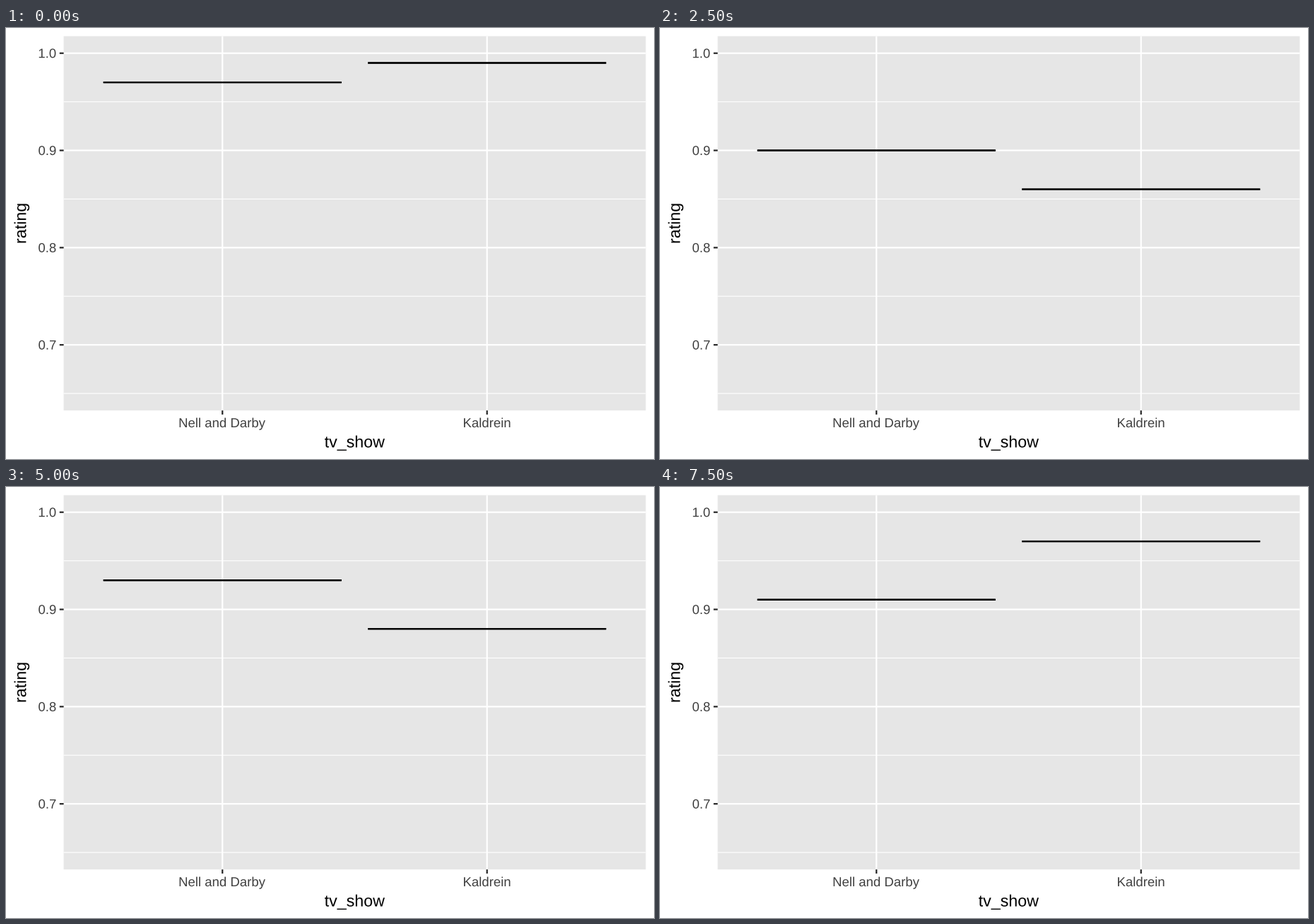
Recreate the animation shown at these times as a matplotlib script. Size 917 by 611 pixels, loop 8000 ms.

```python
import matplotlib.pyplot as plt
import numpy as np
from matplotlib.animation import FuncAnimation
from matplotlib.patches import PathPatch, Rectangle
from matplotlib.textpath import TextPath
from matplotlib.transforms import Affine2D

W, H, DPI = 917, 611, 64
PT = 152 / 72  # stage pixels per layout point
MARGIN, TICK_LEN, GAP = 5.5 * PT, 2.75 * PT, 2.2 * PT
TEXT, TITLE = 8.8 * PT, 11 * PT
THICK = 2.25
INK, TICK, LABEL, PANEL = "black", "#282828", "#404040", "#e6e6e6"

LEFT, RIGHT, TOP, BOTTOM = 81.6, W - MARGIN, MARGIN, 542.2
UNIT = (RIGHT - LEFT) / 2.2

# Ratings in percent, one level per half second.
SHOWS = {
    "Nell and Darby": [97, 89, 92, 90, 88, 90, 98, 97,
                       92, 88, 93, 91, 88, 90, 95, 91],
    "Kaldrein": [99, 82, 87, 67, 82, 86, 65, 85,
                 82, 100, 88, 100, 78, 88, 71, 97],
}
levels = np.array(list(SHOWS.values()))
low, high = levels.min(), levels.max()
pad = 0.05 * (high - low)

plt.rcParams["font.family"] = "Liberation Sans"
fig = plt.figure(figsize=(W / DPI, H / DPI), dpi=DPI, facecolor="white")
ax = fig.add_axes([0, 0, 1, 1])
ax.set_xlim(0, W)
ax.set_ylim(H, 0)
ax.axis("off")


def x_pos(i):
    return LEFT + (i + 0.6) * UNIT


def y_pos(v):
    return TOP + (high + pad - v) / (high - low + 2 * pad) * (BOTTOM - TOP)


def line(x0, y0, x1, y1, color, width=THICK, z=2):
    return ax.plot([x0, x1], [y0, y1], color=color, lw=width * 72 / DPI,
                   solid_capstyle="butt", snap=False, zorder=z)[0]


def label(x, y, text, size, color, align=0.5, angle=0):
    """Place text with its baseline at y; align runs from 0 left to 1 right."""
    path = TextPath((0, 0), text, size=size)
    box = path.get_extents()
    move = (Affine2D().translate(-box.x0 - align * box.width, 0)
            .scale(1, -1).rotate_deg(-angle).translate(x, y))
    ax.add_patch(PathPatch(move.transform_path(path), fc=color, lw=0,
                           snap=False, zorder=4))


ax.add_patch(Rectangle((LEFT, TOP), RIGHT - LEFT, BOTTOM - TOP,
                       fc=PANEL, lw=0, snap=False, zorder=0))

for v in range(65, 101, 5):
    y = y_pos(v)
    if v % 10:
        line(LEFT, y, RIGHT, y, "white", THICK / 2, z=1)
    else:
        line(LEFT, y, RIGHT, y, "white")
        line(LEFT - TICK_LEN, y, LEFT, y, TICK)
        label(LEFT - TICK_LEN - GAP - 0.7, y + 0.35 * TEXT,
              f"{v / 100:.1f}", TEXT, LABEL, align=1)

for i, show in enumerate(SHOWS):
    x = x_pos(i)
    line(x, TOP, x, BOTTOM, "white")
    line(x, BOTTOM, x, BOTTOM + TICK_LEN, TICK)
    label(x, BOTTOM + TICK_LEN + GAP + 0.72 * TEXT, show, TEXT, LABEL)

label((LEFT + RIGHT) / 2, H - MARGIN - 0.21 * TITLE, "tv_show", TITLE, INK)
label(MARGIN + 0.72 * TITLE, (TOP + BOTTOM) / 2, "rating", TITLE, INK, angle=90)


def cap(i):
    half = 0.45 * UNIT
    return line(x_pos(i) - half, 0, x_pos(i) + half, 0, INK, z=3)


# Each error bar is an upper and a lower cap at the same height.
bars = [(cap(i), cap(i)) for i in range(len(SHOWS))]


def update(step):
    for caps, level in zip(bars, levels[:, step]):
        for c in caps:
            c.set_ydata([y_pos(level)] * 2)
    return [c for caps in bars for c in caps]


anim = FuncAnimation(fig, update, frames=levels.shape[1], interval=500,
                     repeat=True, repeat_delay=0)
plt.show()
```
